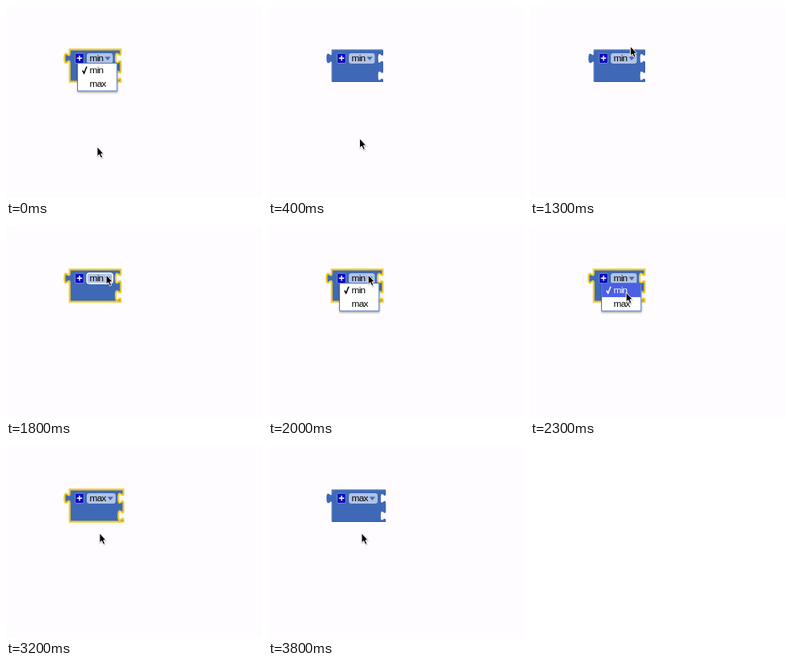
An HTML page for the animation above (4300 ms loop, 320 px wide and 240 px high).

```html
<!DOCTYPE html>
<html lang="en">
<head>
<meta charset="utf-8">
<title>Block dropdown</title>
<style>
  html, body { margin: 0; width: 100%; height: 100%; overflow: hidden; background: #fefcfe; }
  svg { display: block; width: 100vw; height: 100vh; }
  text { font: 11.8px "Liberation Sans", Arial, sans-serif; letter-spacing: -.75px; }
</style>
</head>
<body>
<svg viewBox="0 0 320 240">
  <defs>
    <filter id="shadow" x="-20%" y="-20%" width="140%" height="150%">
      <feDropShadow dx=".3" dy="1.6" stdDeviation="1.2" flood-color="#000" flood-opacity=".35"/>
    </filter>
    <filter id="soft" x="-40%" y="-40%" width="180%" height="180%">
      <feDropShadow dx=".3" dy=".8" stdDeviation=".7" flood-color="#000" flood-opacity=".4"/>
    </filter>
  </defs>
  <path id="shade" fill="#31569a" transform="translate(.5 .5)"/>
  <path id="block" fill="#3f69b7"/>
  <path id="shine" fill="none" stroke="#6a8bc8" stroke-width=".8"/>
  <rect x="86.4" y="59.3" width="10.8" height="12.2" rx="1.4" fill="#0b0bbd" stroke="#93a8dc" stroke-width=".7"/>
  <path d="M88.6 65.3h6.6M91.9 62v6.6" stroke="#fff" stroke-width="1.4"/>
  <rect id="field" x="101" y="59" height="13" rx="3.2" fill="#b1c3e5"/>
  <text id="value" x="104.6" y="69.4"></text>
  <path id="arrow" d="M0 63.6h7.2l-3.6 4.4z" fill="#4068b4"/>
  <g id="menu">
    <rect x="89.5" y="71.5" width="49.3" height="34.6" fill="#fff" stroke="#5578c2" stroke-width="1" filter="url(#shadow)"/>
    <rect id="hover" x="90" width="48.4" height="17.1" fill="#4a5fe4"/>
    <path id="check" d="M95.6 80.6l2 3.4 3.3-8.2" fill="none" stroke-width="1.5"/>
    <text id="item0" x="104.6" y="84.4">min</text>
    <text id="item1" x="104.6" y="101.4">max</text>
  </g>
  <path id="cursor" d="M0 0V12L2.6 9.6 4.7 14 6.7 13.1 4.8 8.8H8.1Z" fill="#000" stroke="#fff" stroke-width=".9" stroke-linejoin="round" filter="url(#soft)"/>
</svg>
<script>
const LOOP = 4300, STEP = 100;
const $ = id => document.getElementById(id);
const set = (id, attrs) => {
  for (const name in attrs) $(id).setAttribute(name, attrs[name]);
};
const show = (id, on) => set(id, { visibility: on ? "visible" : "hidden" });

// Pointer tip: time, x, y
const path = [
  [300, 114, 176], [500, 115, 155], [700, 122, 106], [800, 125, 87.5],
  [900, 125.3, 78], [1200, 125.6, 45], [1500, 125.2, 61], [2100, 125.2, 61],
  [2300, 120.2, 83], [2600, 118.2, 94.5], [2800, 118.2, 94.5], [3200, 117, 109]
];

function pointer(t) {
  const i = path.findIndex(p => p[0] > t);
  if (i === 0) return path[0].slice(1);
  if (i < 0) return path[path.length - 1].slice(1);
  const [a, b] = [path[i - 1], path[i]];
  const k = (t - a[0]) / (b[0] - a[0]);
  return [1, 2].map(n => a[n] + (b[n] - a[n]) * k);
}

function outline(right) {
  const socket = "c0 8.5-6.4-6.8-6.4 6.4s6.4-2.1 6.4 6.4";
  const tab = "c0-8.5-6.4 6.8-6.4-6.4s6.4 2.1 6.4-6.4";
  return `M79.6 54.4H${right}V58.8${socket}V80.6${socket}V94.6H79.6V71.6${tab}Z`;
}

function draw(now) {
  const t = Math.floor(now % LOOP / STEP) * STEP;
  const [x, y] = pointer(t);
  const open = t < 100 || t >= 2000 && t < 2700;
  const selected = t < 100 || t >= 1700 && t < 3500;
  const max = t >= 2700;
  const right = max ? 146.8 : 143.5;
  const shape = outline(right);

  set("block", { d: shape, stroke: selected ? "#f1cb2b" : "none", "stroke-width": 2.2 });
  set("shade", { d: shape });
  set("shine", { d: `M80 94V72M80 58.5V54.9H${right - .3}` });
  show("shade", !selected);
  show("shine", !selected);

  const over = !open && x > 101 && x < 134 && y > 59 && y < 72;
  set("field", { width: max ? 36 : 32.5, stroke: over ? "#fff" : "none", "stroke-width": 1.3 });
  $("value").textContent = max ? "max" : "min";
  set("arrow", { transform: `translate(${max ? 126.8 : 123.5} 0)` });

  const row = open && y > 72 && y < 106 ? +(y > 89) : -1;
  show("menu", open);
  show("hover", open && row >= 0);
  set("hover", { y: row === 1 ? 88.6 : 71.8 });
  for (const i of [0, 1]) set("item" + i, { fill: row === i ? "#fff" : "#000" });
  set("check", { stroke: row === 0 ? "#fff" : "#000" });
  set("cursor", { transform: `translate(${x} ${y})` });
}

const start = performance.now();
function tick() {
  draw(performance.now() - start);
  requestAnimationFrame(tick);
}
tick();
</script>
</body>
</html>
```
